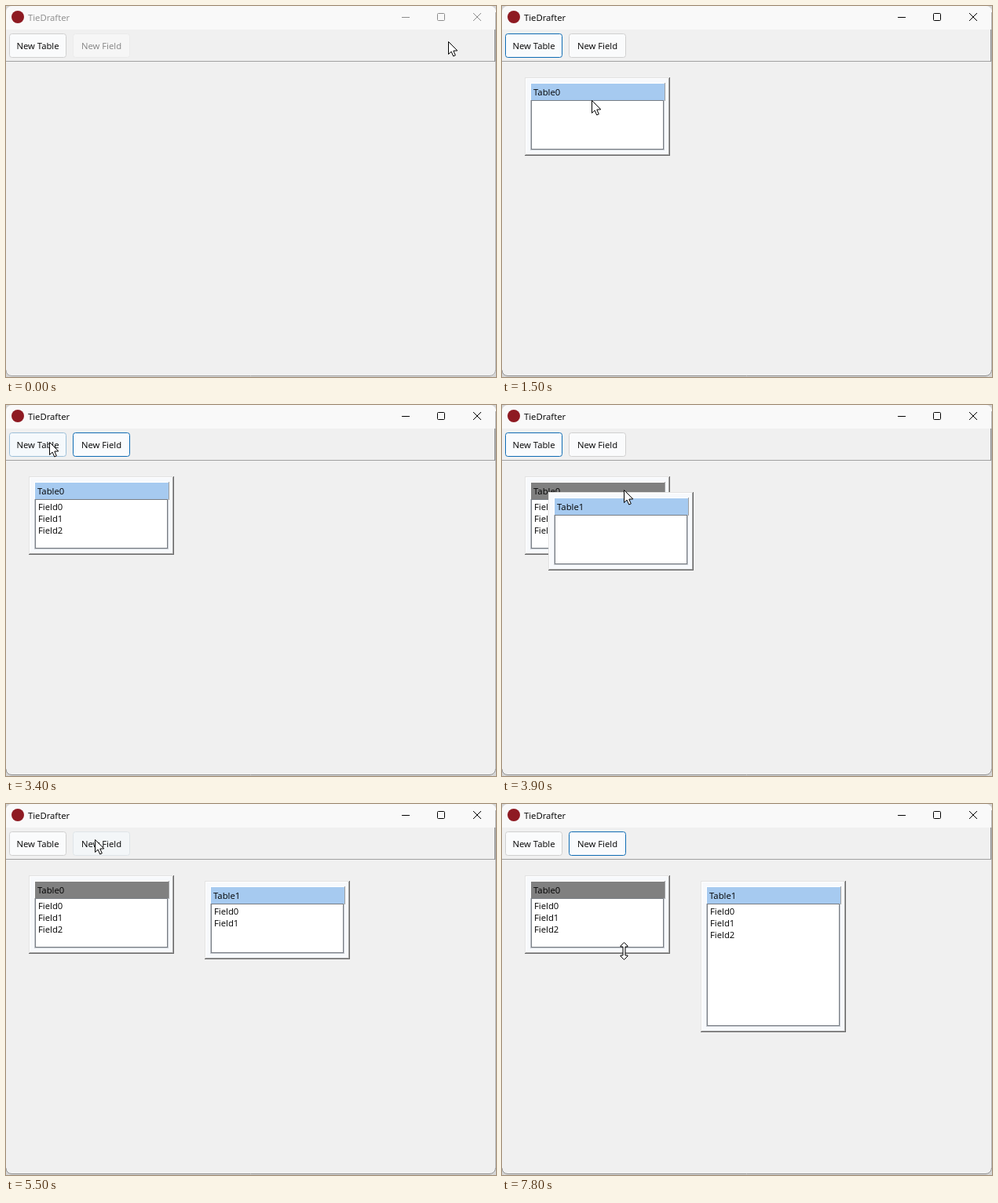
An HTML page with a canvas that plays this animation: 624 by 473 pixels, repeating every 8 s.

```html
<!DOCTYPE html>
<html lang="en">
<head>
<meta charset="utf-8">
<title>TieDrafter</title>
<style>
  html, body { margin: 0; width: 100%; height: 100%; overflow: hidden; background: #f0f0f0; }
  canvas { display: block; width: 624px; height: 473px; }
</style>
</head>
<body>
<canvas id="stage" width="624" height="473"></canvas>
<script>
const ctx = document.getElementById('stage').getContext('2d');
const LOOP = 8000, STEP = 100;
const FONT = '11.3px "Open Sans", "Noto Sans", sans-serif';

// Where the pointer rests: x, y, arrival and departure time
const STOPS = [
  { x: 563, y: 45, from: 0, to: 0 },
  { x: 59, y: 52, from: 500, to: 900 },        // New Table
  { x: 114, y: 120, from: 1300, to: 1500 },    // select the first table
  { x: 118, y: 52, from: 1800, to: 3200 },     // New Field
  { x: 55, y: 47, from: 3400, to: 3600 },      // New Table
  { x: 188, y: 128, from: 4000, to: 4100 },    // grab the second table
  { x: 327, y: 127, from: 4400, to: 4400 },
  { x: 382, y: 115, from: 4600, to: 4700 },    // drop it
  { x: 113, y: 45, from: 5100, to: 5800 },     // New Field
  { x: 334, y: 196, from: 6200, to: 6400 },    // grab its lower edge
  { x: 347, y: 289, from: 6700, to: 6800 },
  { x: 157, y: 185, from: 7200, to: 7500 },
  { x: 155, y: 187.5, from: 7800, to: LOOP }
];
const SELECT = 1400, GRAB = 4100, DROP = 4600, EDGE = 6400, EDGE_END = 6700;

// Each table gets three fields, one per click
const FIELDS = [{ first: 2500, gap: 350 }, { first: 5200, gap: 300 }];
const fieldClicks = FIELDS.flatMap(f => [0, 1, 2].map(i => f.first + i * f.gap));
const BUTTONS = [
  { label: 'New Table', x: 4, clicks: [700, 3600] },
  { label: 'New Field', x: 85, clicks: fieldClicks, enabled: SELECT }
];

// Fill, border, text
const LOOK = {
  normal:   ['#fafbfc', '#d0d0d0', '#000'],
  disabled: ['#f6f6f6', '#ebebeb', '#848484'],
  pressed:  ['#f3f6f8', '#dfe4e8', '#000'],
  entering: ['#f5f9fc', '#9cbfd8', '#000'],
  hover:    ['#e3eef9', '#4488bd', '#000'],
  focus:    ['#f9fbfd', '#0f6cb4', '#000']
};

const clamp = (v, lo, hi) => Math.min(Math.max(v, lo), hi);

function pointerAt(t) {
  const i = STOPS.findIndex(s => s.to >= t), b = STOPS[i];
  if (i < 1 || t >= b.from) return b;
  const a = STOPS[i - 1], k = (t - a.to) / (b.from - a.to);
  return { x: a.x + (b.x - a.x) * k, y: a.y + (b.y - a.y) * k };
}

function isOver(button, t) {
  const p = pointerAt(t);
  return p.x >= button.x && p.x < button.x + 73 && p.y >= 35 && p.y < 66;
}

const lastPress = (button, t) =>
  Math.max(-1, ...button.clicks.map(c => c - STEP).filter(c => c <= t));

function hasFocus(button, t) {
  const press = lastPress(button, t);
  const rival = Math.max(...BUTTONS.filter(b => b !== button).map(b => lastPress(b, t)));
  return press > rival && !(t >= GRAB && press < GRAB);
}

function lookOf(button, t) {
  if (t < button.enabled) return 'disabled';
  if (button.clicks.some(c => Math.abs(t - c + 1) <= STEP)) return 'pressed';
  if (hasFocus(button, t)) return 'focus';
  if (!isOver(button, t)) return 'normal';
  return isOver(button, t - STEP) ? 'hover' : 'entering';
}

function rect(x, y, w, h, color) {
  ctx.fillStyle = color;
  ctx.fillRect(x, y, w, h);
}

function text(str, x, y, color = '#000', align = 'left') {
  ctx.fillStyle = color;
  ctx.textAlign = align;
  ctx.fillText(str, x, y);
}

function paint(fill, stroke) {
  ctx.lineWidth = 1;
  ctx.fillStyle = fill;
  ctx.strokeStyle = stroke;
  ctx.fill();
  ctx.stroke();
}

function drawWindow(active) {
  const ink = active ? '#000' : '#8c8c8c';
  rect(0, 0, 624, 473, '#d4d4d4');
  ctx.save();
  ctx.beginPath();
  ctx.roundRect(0, 0, 624, 472, 8);
  ctx.clip();
  rect(0, 0, 624, 473, '#f0f0f0');
  rect(0, 0, 624, 30, '#f9f9f9');
  rect(0, 70, 623, 1, '#a0a0a0');
  rect(622, 30, 1, 41, '#8c8c8c');
  rect(623, 8, 1, 456, '#b4b4b4');
  ctx.restore();

  ctx.lineWidth = 1;
  ctx.strokeStyle = active ? '#8f8f8f' : '#a4a4a4';
  ctx.beginPath();
  ctx.moveTo(0, 464);
  ctx.arcTo(0.5, 471.5, 8, 471.5, 7);
  ctx.lineTo(616, 471.5);
  ctx.arcTo(623.5, 471.5, 623.5, 464, 7.5);
  ctx.stroke();

  ctx.fillStyle = '#8e1a22';
  ctx.beginPath();
  ctx.arc(15, 14, 8, 0, Math.PI * 2);
  ctx.fill();
  text('TieDrafter', 28, 19, ink);

  ctx.strokeStyle = ink;
  ctx.beginPath();
  ctx.moveTo(504, 14.5);
  ctx.lineTo(514, 14.5);
  ctx.roundRect(549.5, 9.5, 9, 9, 1);
  ctx.moveTo(595, 9);
  ctx.lineTo(605, 19);
  ctx.moveTo(605, 9);
  ctx.lineTo(595, 19);
  ctx.stroke();
}

function drawButton(button, t) {
  const [fill, border, ink] = LOOK[lookOf(button, t)];
  ctx.beginPath();
  ctx.roundRect(button.x + 0.5, 35.5, 72, 30, 3);
  paint(fill, border);
  text(button.label, button.x + 36.5, 55, ink, 'center');
}

function drawTable(index, x, y, h, selected, t) {
  const w = 185;
  rect(x, y, w, h, '#696969');
  rect(x, y, w - 1, h - 1, '#e3e3e3');
  rect(x + 1, y + 1, w - 2, h - 2, '#a0a0a0');
  rect(x + 1, y + 1, w - 3, h - 3, '#ffffff');
  rect(x + 2, y + 2, w - 4, h - 4, '#f7f9fc');

  // Raised title
  rect(x + 7, y + 7, 172, 23, '#a0a0a0');
  rect(x + 7, y + 7, 171, 22, '#ffffff');
  rect(x + 8, y + 8, 170, 21, selected ? '#a6caf0' : '#808080');
  text('Table' + index, x + 11, y + 23);

  // Field list
  rect(x + 7, y + 29, 171, h - 36, '#c4c8ce');
  rect(x + 8, y + 29, 169, h - 37, '#787d84');
  rect(x + 9, y + 30, 167, h - 39, '#ffffff');
  const { first, gap } = FIELDS[index];
  const count = clamp(Math.floor((t - first) / gap) + 1, 0, 3);
  for (let i = 0; i < count; i++) text('Field' + i, x + 12, y + 43 + i * 15);
}

function drawPointer(p, resizing) {
  const half = [[0, -11], [4.5, -6.5], [4.5, -5.5], [1.5, -5.5], [1.5, 5.5], [4.5, 5.5], [4.5, 6.5]];
  const arrow = [[0, 0], [0, 16], [3.6, 12.6], [6.2, 18.5], [8.8, 17.4], [6.3, 11.6], [11.3, 11.4]];
  const points = resizing ? half.concat(half.map(([x, y]) => [-x, -y])) : arrow;
  ctx.save();
  ctx.translate(Math.round(p.x) + 0.5, Math.round(p.y) + (resizing ? -0.5 : 0.5));
  ctx.beginPath();
  points.forEach(([x, y]) => ctx.lineTo(x, y));
  ctx.closePath();
  paint('#fff', '#000');
  ctx.restore();
}

function draw(t) {
  const [created0, created1] = BUTTONS[0].clicks;
  ctx.font = FONT;
  drawWindow(t >= created0 - STEP);
  BUTTONS.forEach(b => drawButton(b, t));

  if (t >= created0) drawTable(0, 29, 91, 100, t < created1, t);
  if (t >= created1) {
    // The drag moves the table, the later one its lower edge
    const grab = pointerAt(GRAB), hold = pointerAt(clamp(t, GRAB, DROP));
    const stretch = pointerAt(clamp(t, EDGE, EDGE_END)).y - pointerAt(EDGE).y;
    drawTable(1, Math.round(59 + hold.x - grab.x), Math.round(111 + hold.y - grab.y),
      Math.round(100 + stretch), true, t);
  }
  drawPointer(pointerAt(t), (t >= 6200 && t < 7000) || t >= 7200);
}

const start = performance.now();
function tick() {
  const t = (performance.now() - start) % LOOP;
  draw(Math.floor(t / STEP) * STEP);
  requestAnimationFrame(tick);
}
tick();
</script>
</body>
</html>
```
